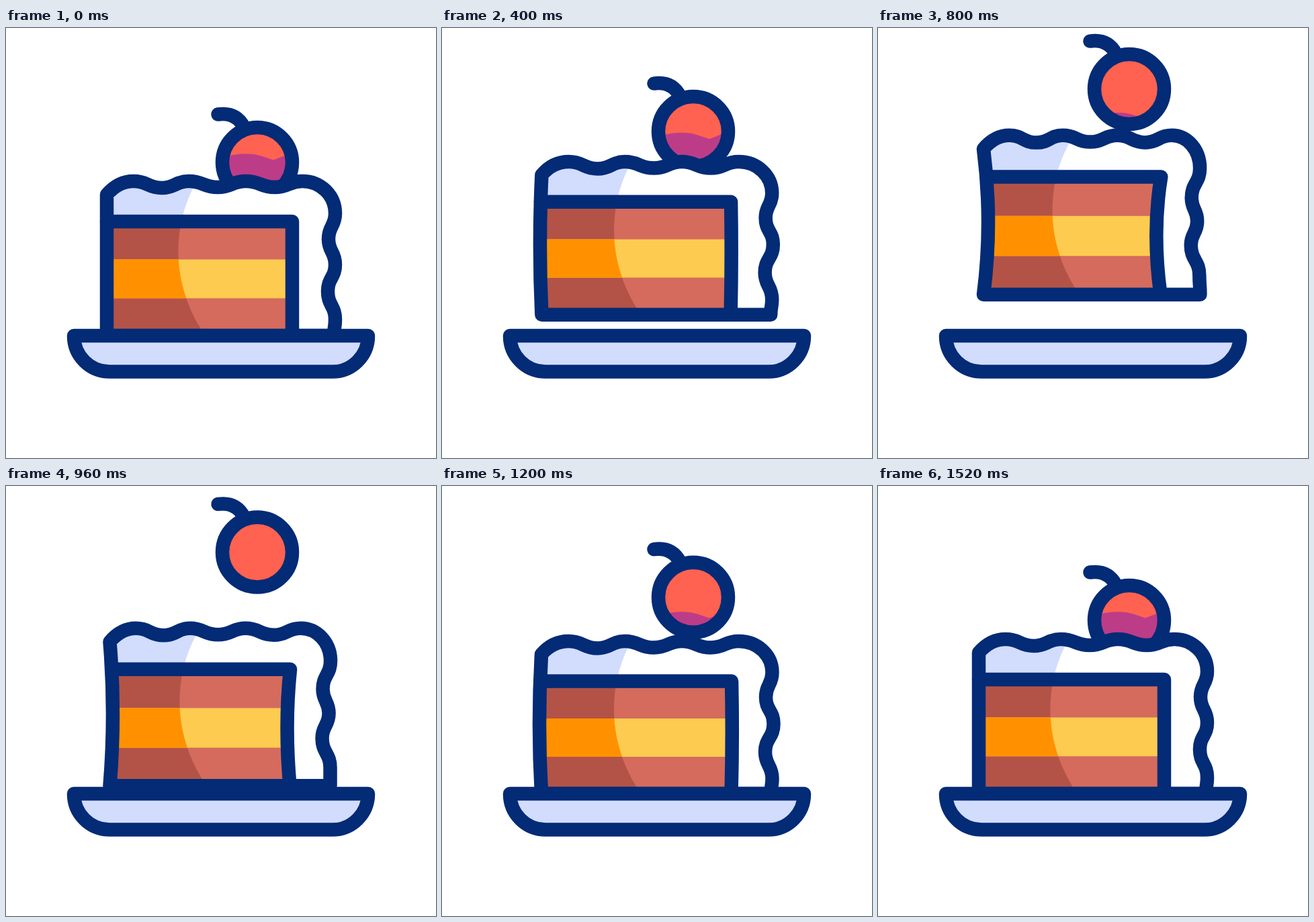
Animation, 640 px wide and 640 px high, one loop 1.56 s. Source, as an HTML page:

```html
<!DOCTYPE html>
<html lang="en">
<head>
<meta charset="utf-8">
<title>Cake</title>
<style>
  html, body { margin: 0; width: 100%; height: 100%; overflow: hidden; background: #fff; }
  svg { display: block; width: 100vw; height: 100vh; }
  .line { fill: none; stroke: #032b76; stroke-width: 20.5; stroke-linecap: round; stroke-linejoin: round; }
</style>
</head>
<body>
<svg viewBox="0 0 640 640">
  <defs>
    <clipPath id="bodyClip"><path id="bodyShape"/></clipPath>
    <clipPath id="spongeClip"><path id="spongeShape"/></clipPath>
    <clipPath id="cherryClip"><circle cx="374" cy="200" r="48"/></clipPath>
  </defs>

  <g id="cherry">
    <g clip-path="url(#cherryClip)">
      <circle cx="374" cy="200" r="48" fill="#ff6250"/>
      <path id="glow" fill="#bd3c88" d="M322 193C345 185.500 366 186 380 190.500L398 196.500L430 184V270H322Z"/>
    </g>
    <circle class="line" cx="374" cy="200" r="52"/>
    <path class="line" d="M315.500 128.500C333 126 346 132 354 147"/>
  </g>

  <g id="cake">
    <g clip-path="url(#bodyClip)">
      <rect x="100" y="200" width="440" height="280" fill="#fff"/>
      <path class="shade" fill="#d2dcfd"/>
      <g clip-path="url(#spongeClip)">
        <rect x="100" y="200" width="440" height="280" fill="#d46b5d"/>
        <path class="shade" fill="#b35347"/>
        <g id="cream"></g>
      </g>
    </g>
    <path id="spongeLine" class="line"/>
    <path id="bodyLine" class="line"/>
  </g>

  <path class="line" style="fill:#d2dcfd" d="M101 458H539C539 488 515 511.500 486 511.500H154C125 511.500 101 488 101 458Z"/>
</svg>
<script>
const LOOP = 1560, BASE = 458;
const $ = id => document.getElementById(id);

// Outline: corner, 7 icing waves, 6 points down the right side,
// left middle, left bottom, then the sponge edge (top, middle, bottom).
const REST = [150,248, 190,228, 232,238, 272,228, 315,237, 357,228, 400,237, 441,228,
  490,276, 480,314, 490,352, 479,392, 490,434, 488,458,
  150,353, 150,458, 426,288, 426,373, 426,458];
const WIDE = [146,253, 187,234, 231,245, 272,234, 316,244, 357,234, 400,244, 442,234,
  493,279, 484,314, 497,356, 483,400, 493,437, 491,458,
  140,355, 146,458, 436,293, 437.5,375, 435,458];
const TALL = [159,239, 197,219, 237,230, 276,219, 316,229, 356,219, 397,230, 436,219,
  476,268, 463,314, 471,348, 462,382, 475,428, 477,458,
  168,349, 159,458, 420,281, 411,366, 419,458];

// Smooth track through [time, value] keys, flat at the turning points.
function track(keys) {
  const slope = i => {
    if (!i || i === keys.length - 1) return 0;
    const [[t0, a], [t1, b], [t2, c]] = keys.slice(i - 1, i + 2);
    return (b - a) * (c - b) <= 0 ? 0 : (c - a) / (t2 - t0);
  };
  const slopes = keys.map((_, i) => slope(i));
  return t => {
    let i = 0;
    while (i < keys.length - 2 && t > keys[i + 1][0]) i++;
    const [t0, a] = keys[i], [t1, b] = keys[i + 1], d = t1 - t0;
    const u = Math.min(1, (t - t0) / d), w = u * u * (3 - 2 * u);
    return a + (b - a) * w + d * u * (1 - u) * ((1 - u) * slopes[i] - u * slopes[i + 1]);
  };
}

// -1 is squashed, 1 is stretched
const stretch = track([[0, 0], [240, -1], [300, -1], [580, 1], [800, .78],
  [960, .5], [1200, -.5], [1300, -.7], [1500, 0]]);
const dip = track([[0, 0], [240, 2], [310, 2]]);

const lift = t => Math.max(0, 68 * (1 - (t < 680
  ? ((680 - t) / 380) ** 2
  : ((t - 680) / 303) ** 2.5)));

function cherryY(t) {
  if (t < 310) return dip(t);
  if (t < 840) return 2 - 111 * (1 - ((840 - t) / 530) ** 3);
  return Math.min(0, -109 * (1 - (Math.max(0, t - 850) / 424) ** 2));
}

function pose(s) {
  const to = s < 0 ? WIDE : TALL, k = Math.abs(s), pts = [];
  for (let i = 0; i < REST.length; i += 2)
    pts.push([0, 1].map(j => REST[i + j] + (to[i + j] - REST[i + j]) * k));
  return pts;
}

// Quadratic curve from a to b through m.
const bend = (a, m, b) =>
  `Q${2 * m[0] - (a[0] + b[0]) / 2} ${2 * m[1] - (a[1] + b[1]) / 2} ${b}`;

function outline(p) {
  const [x, y] = p[0];
  let d = `M${x} ${y}C${x + 12} ${y - 14} ${p[1][0] - 14} ${p[1][1]} ${p[1]}`;
  for (let i = 2; i < 14; i++) {
    const [ax, ay] = p[i - 1], [bx, by] = p[i];
    const mx = (ax + bx) / 2, my = (ay + by) / 2;
    if (i < 8) d += `C${mx} ${ay} ${mx} ${by} ${bx} ${by}`;
    else if (i === 8) d += `C${ax + (bx - ax) * .56} ${ay} ${bx} ${by - (by - ay) * .56} ${bx} ${by}`;
    else d += `C${ax} ${my} ${bx} ${my} ${bx} ${by}`;
  }
  return d + `L${p[15]}${bend(p[15], p[14], p[0])}Z`;
}

const shades = document.querySelectorAll('.shade');
const NS = 'http://www.w3.org/2000/svg';
const [cream, creamShade] = ['#fdcb50', '#ff9100'].map(fill => {
  const el = document.createElementNS(NS, 'path');
  el.setAttribute('fill', fill);
  return $('cream').appendChild(el);
});
const setD = (el, d) => el.setAttribute('d', d);
const moveY = (el, y) => el.setAttribute('transform', `translate(0 ${y})`);

// x of the shade border at height y, found by bisection on its curve
const bez = (a, b, c, d, u) => {
  const v = 1 - u;
  return a * v * v * v + 3 * b * v * v * u + 3 * c * v * u * u + d * u * u * u;
};
function borderX(y) {
  let lo = 0, hi = 1;
  for (let i = 0; i < 20; i++) {
    const mid = (lo + hi) / 2;
    if (bez(228, 290, 380, 460, mid) < y) lo = mid; else hi = mid;
  }
  return bez(284, 248, 242, 298, lo);
}

function draw(t) {
  const s = stretch(t), up = lift(t), cy = cherryY(t), p = pose(s);
  const body = outline(p), [top, mid, bottom] = p.slice(16);
  const edge = `${top}${bend(top, mid, bottom)}`;
  const shift = s > 0 ? 4 * s : s;

  setD($('bodyShape'), body);
  setD($('bodyLine'), body);
  setD($('spongeShape'), `M100 ${top[1]}L${edge}H100Z`);
  setD($('spongeLine'), `M${p[0][0] + (p[14][0] - p[0][0]) * .6} ${top[1]}L${edge}`);
  shades.forEach(el => setD(el,
    `M${284 + shift} 228C${248 + shift} 290 ${242 + shift} 380 ${298 + shift} 460H100V200H${298 + shift}Z`));

  const y0 = top[1] + (BASE - top[1]) * .332, y1 = top[1] + (BASE - top[1]) * .672;
  setD(cream, `M100 ${y0}H540V${y1}H100Z`);
  let d = `M100 ${y0}`;
  for (let i = 0; i <= 12; i++) {
    const y = y0 + (y1 - y0) * i / 12;
    d += `L${borderX(y) + shift} ${y}`;
  }
  setD(creamShade, d + `H100Z`);

  moveY($('cake'), -up);
  moveY($('cherry'), cy);
  moveY($('glow'), -up - cy);
}

function tick(now) {
  draw(now % LOOP);
  requestAnimationFrame(tick);
}
draw(0);
requestAnimationFrame(tick);
</script>
</body>
</html>
```
